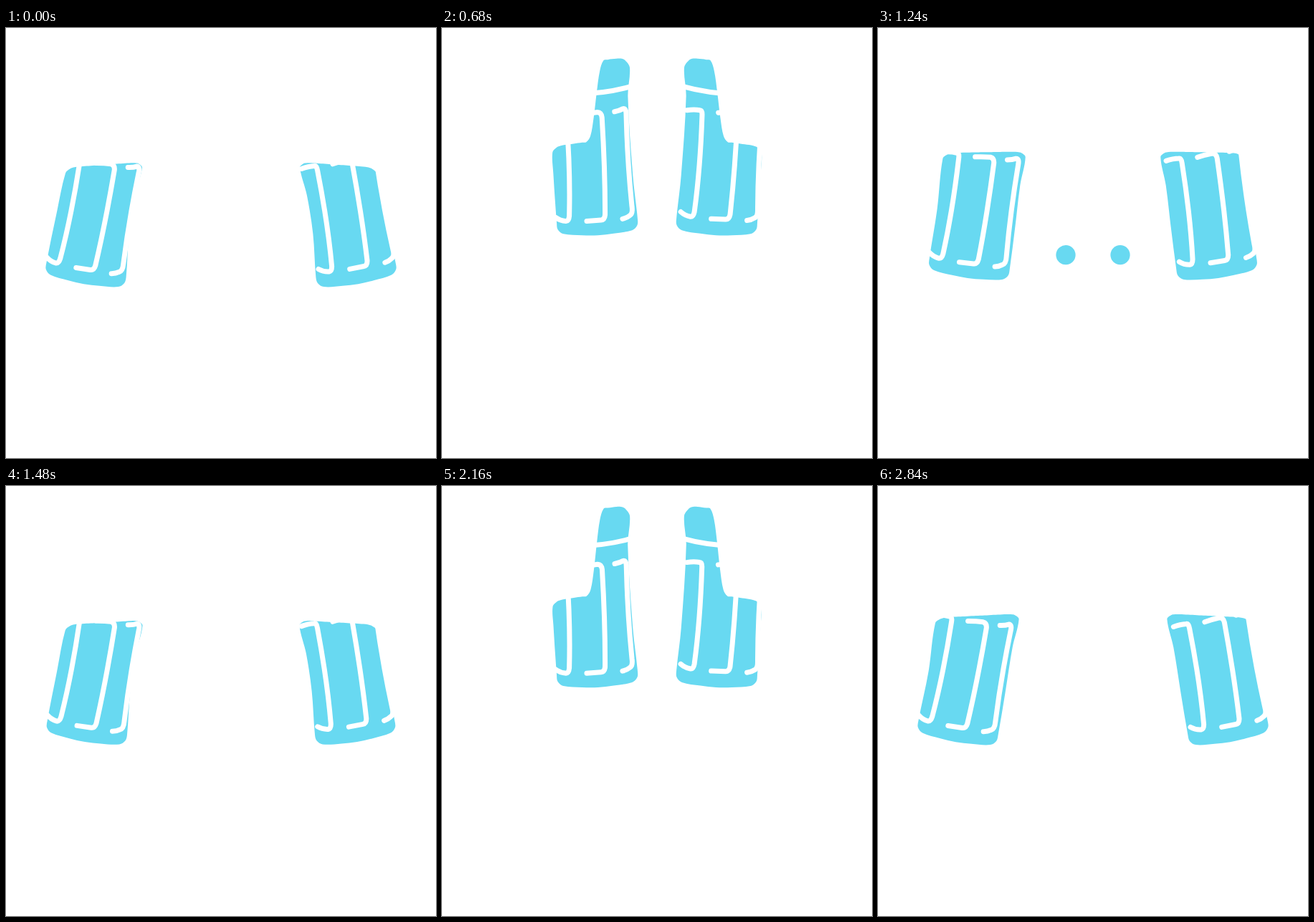
These frames come from a looping animation (600x600 px, 2.88 s). An HTML page:

```html
<!DOCTYPE html>
<html lang="en">
<head>
<meta charset="utf-8">
<title>Cheers</title>
<style>
  html, body { margin: 0; width: 100%; height: 100%; overflow: hidden; background: #fff; }
  svg { display: block; width: 100vw; height: 100vh; }
  .blue { fill: #68d9f1; }
  .line { fill: none; stroke: #fff; stroke-width: 7; stroke-linecap: round; stroke-linejoin: round; }
</style>
</head>
<body>
<svg viewBox="0 0 600 600">
  <defs>
    <g id="grooves" class="line">
      <path d="M-67-150Q-57-152-49-151Q-45.500-151-45.500-144Q-44-70-49-9Q-50-2-54-2Q-62-3-68-8"/>
      <path d="M-23-149Q-12-151-2-151.500Q3.500-151 4-144Q4.500-70 1-8Q0-1-5-1L-25-.5"/>
      <path d="M22-151Q29-152 34-154.500Q38-155 38-148Q36-80 39-18Q40-7 35-5Q31-2 25-1"/>
    </g>
    <path id="glass" fill="#fff" d="M-66-180Q0-172 66-180L70-175L72 20Q0 50-72 20L-70-175Z"/>
    <path id="rim" class="line" d="M-58-184Q0-172 58-185"/>
  </defs>
  <g id="stage"></g>
</svg>
<script>
const CYCLE = 1440, STEP = 40;
const CLINK = 720, BACK = 1040, REST = 1360;
const HALF = 57;
const BASE = [[56.5, 0], [55.5, 9], [48, 15.5], [22, 18.8]];

const part = (t, from, to) => Math.min(1, Math.max(0, (t - from) / (to - from)));
const ease = (t, from, to) => (1 - Math.cos(Math.PI * part(t, from, to))) / 2;
const easeIn = (t, from, to) => part(t, from, to) ** 2;
const easeOut = (t, from, to) => Math.sin(Math.PI / 2 * part(t, from, to));
const mix = (a, b, p) => a + (b - a) * p;

// Swing in and up to the clink, sag a little, then drop back to rest.
function pose(t) {
  const rest = { x: 112, y: 337.5, tilt: 10 };
  const sag = easeIn(t, CLINK, BACK), home = easeOut(t, BACK, REST);
  const x = mix(rest.x, 216.5, ease(t, 0, 560)) - 11 * sag;
  const y = mix(rest.y, 261, easeIn(t, 0, CLINK)) + 27 * sag;
  const tilt = rest.tilt - 16.3 * ease(t, 0, 360) + 3.3 * ease(t, 360, CLINK);
  return { x: mix(x, rest.x, home), y: mix(y, rest.y, home), tilt: mix(tilt, rest.tilt, home) };
}

// Outline of the beer: tilted surface, a jet at the inner wall, rounded base.
function beer(t, tilt) {
  const jet = ease(t, 480, CLINK) - ease(t, 760, 1200);
  const lag = 1 - part(t, 0, 300);
  const level = -149 - 10 * easeOut(t, BACK, REST) + 40 * jet;
  const slope = (6 - 1.9 * tilt) * (1 - jet) ** 3 - 5 * jet;
  const tip = HALF - 5 * lag, wall = 55 - 6 * lag - 3 * jet;
  const surface = [];
  for (let u = -HALF; u <= HALF; u += 6) {
    const s = u / HALF;
    const round = (u > 0 ? 8 + 8 * jet : 8) * s ** 12;
    surface.push([s * tip, level + slope * s - 118 * jet * ease(u, -8, 22) + round]);
  }
  const shoulder = Math.min(-110, surface[surface.length - 1][1] + 40);
  const mirrored = BASE.map(([u, v]) => [-u, v]).reverse();
  return [...surface, [wall, shoulder], [wall + 1, -60],
    ...BASE, [0, 20], ...mirrored, [0.3 * Math.max(0, tilt) - 57.5, -70]];
}

// Closed smooth curve through the points.
function curve(pts) {
  const n = pts.length;
  const dirs = pts.map((_, i) => {
    const a = pts[(i + n - 1) % n], b = pts[(i + 1) % n];
    const len = Math.hypot(b[0] - a[0], b[1] - a[1]);
    return [(b[0] - a[0]) / len, (b[1] - a[1]) / len];
  });
  const put = (p, d, k) => (p[0] + d[0] * k).toFixed(2) + ' ' + (p[1] + d[1] * k).toFixed(2);
  let path = 'M' + put(pts[0], dirs[0], 0);
  pts.forEach((p, i) => {
    const j = (i + 1) % n, q = pts[j];
    const k = Math.hypot(q[0] - p[0], q[1] - p[1]) / 3;
    path += 'C' + [put(p, dirs[i], k), put(q, dirs[j], -k), put(q, dirs[j], 0)].join(' ');
  });
  return path + 'Z';
}

// The right mug mirrors the left one, but its grooves keep their direction.
const SIDES = ['', 'translate(600 0) scale(-1 1)'];
const GROOVES = ['translate(10.5 0)', 'scale(-1 1) translate(17 -2)'];
const stage = document.getElementById('stage');
stage.innerHTML =
  SIDES.map(s => `<g transform="${s}"><circle class="drop blue"/></g>`).join('') +
  SIDES.map((s, i) => `<g transform="${s}"><g class="mug"><use href="#glass"/>
    <path class="beer blue"/><use href="#rim"/>
    <use href="#grooves" transform="${GROOVES[i]}"/></g></g>`).join('');

function setAll(selector, attrs) {
  for (const el of stage.querySelectorAll(selector))
    for (const name in attrs) el.setAttribute(name, attrs[name]);
}

function draw(t) {
  const { x, y, tilt } = pose(t);
  setAll('.mug', { transform: `translate(${x} ${y}) rotate(${tilt})` });
  setAll('.beer', { d: curve(beer(t, tilt)) });

  const fall = t - 800;
  setAll('.drop', {
    cx: 244 + 18 * part(fall, 0, 336),
    cy: 49 + 0.472 * fall + 0.00031 * fall * fall,
    r: fall >= 0 && t <= REST ? mix(18, 11, part(t, BACK, REST)) : 0
  });
}

const start = performance.now();
function frame() {
  const t = (performance.now() - start) % CYCLE;
  draw(Math.floor(t / STEP) * STEP);
  requestAnimationFrame(frame);
}
frame();
</script>
</body>
</html>
```
